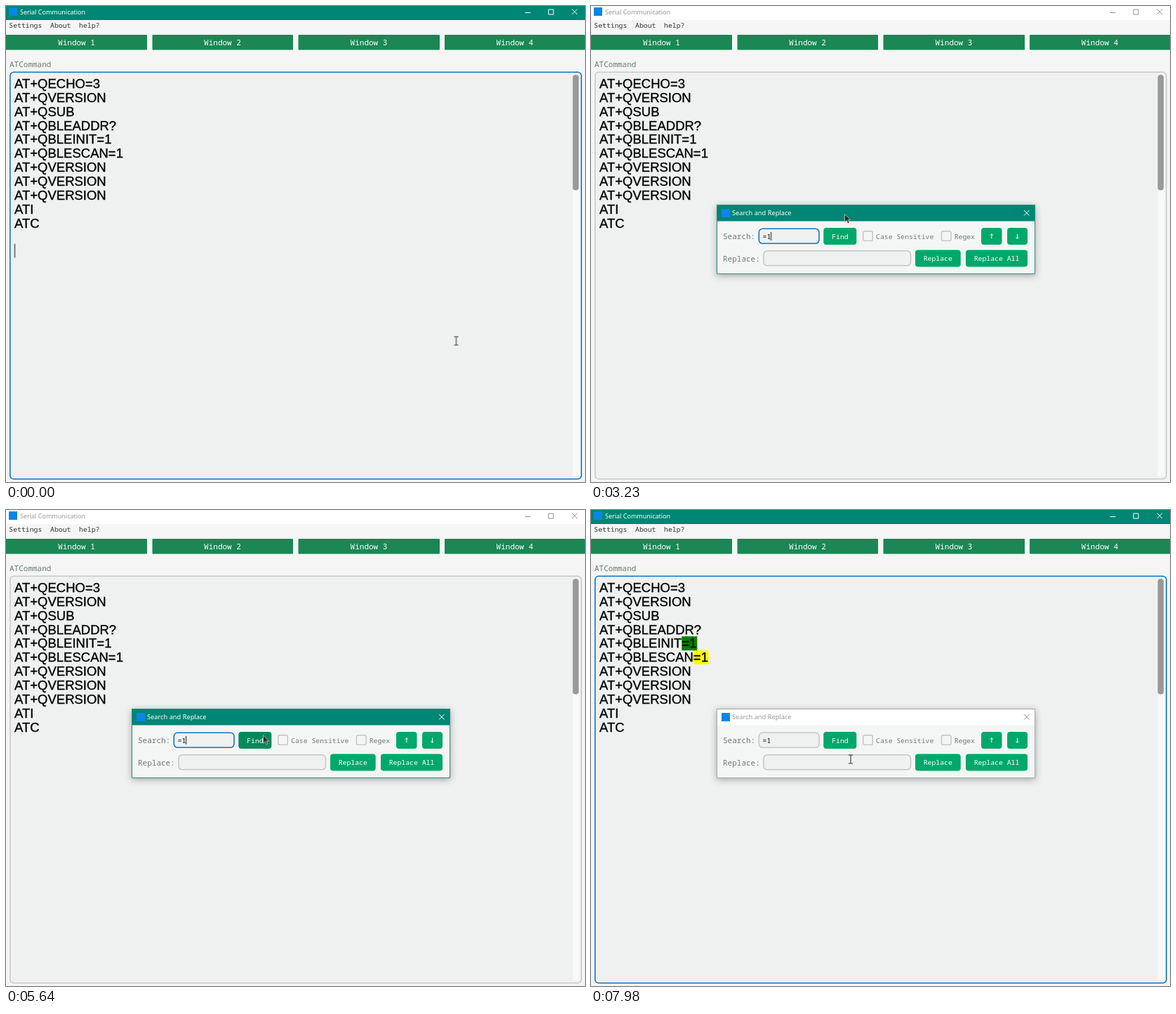
These frames come from a looping animation (825x678 px, 8 s). An HTML page:

```html
<!DOCTYPE html>
<html lang="en">
<head>
<meta charset="utf-8">
<title>Serial Communication</title>
<style>
  html, body { margin: 0; width: 100%; height: 100%; overflow: hidden; background: #f5f5f5; }
  svg { display: block; width: 100%; height: 100%; }

  .ui { font: 9px "Noto Sans", "Open Sans", sans-serif; }
  .mono { font: 9.8px "Noto Sans Mono", "DejaVu Sans Mono", monospace; }
  .big { font-size: 11px; }
  .mid { text-anchor: middle; }
  .code { font: 18.5px "Liberation Sans", Arial, sans-serif; stroke: #000; stroke-width: .35px; }
  .label { fill: #6b7d74; }
  .btn { fill: #00a86b; }
  .tab { fill: #1a8754; }
  .box { fill: #eff1f0; stroke: #c6c8c7; stroke-width: 1.6; }
  .check { fill: #f4f5f5; stroke: #c2c4c3; stroke-width: 1.4; }
  .logo { fill: #0a86e4; }
  .line { fill: none; stroke-width: 1; }

  /* Hard changes share one 8 s clock */
  .mainBar, .mainInk, .mainLine, .editor, .dlgBar, .dlgInk, .dlgLine, .dlgEdge, .search,
  .caret, .hits, .eq, .one, .fieldCaret, .find, .down, .beam, .arrow, .halo {
    animation: 8s step-end infinite;
  }
  .mainBar { animation-name: mainBar; }
  .mainInk { animation-name: mainInk; }
  .mainLine { animation-name: mainLine; }
  .editor { animation-name: editor; }
  .dlgBar { animation-name: dlgBar; }
  .dlgInk { animation-name: dlgInk; }
  .dlgLine { animation-name: dlgLine; }
  .dlgEdge { animation-name: dlgEdge; }
  .search { animation-name: search; }
  .caret { animation-name: caret; }
  .hits { animation-name: hits; }
  .eq { animation-name: eq; }
  .one { animation-name: one; }
  .fieldCaret { animation-name: fieldCaret; }
  .find { animation-name: find; }
  .down { animation-name: down; }
  .beam { animation-name: beam; }
  .arrow { animation-name: arrow; }
  .halo { animation-name: halo; }

  .dialog { animation: open 8s linear infinite; transform-origin: 406px 332.5px;
            filter: drop-shadow(0 2px 5px rgba(0,0,0,.32)); }
  .pointer { animation: move 8s linear infinite; }

  @keyframes mainBar { 0%, 78.37% { fill: #008675 } 25.12% { fill: #fff } }
  @keyframes mainInk { 0%, 78.37% { fill: #fff } 25.12% { fill: #999 } }
  @keyframes mainLine { 0%, 78.37% { stroke: #fff } 25.12% { stroke: #8c8c8c } }
  @keyframes editor { 0%, 77.49% { stroke: #0f75c4 } 25.12% { stroke: #c9cbca } }
  @keyframes dlgBar { 0% { fill: #008675 } 78.37% { fill: #fff } }
  @keyframes dlgInk { 0% { fill: #fff } 78.37% { fill: #999 } }
  @keyframes dlgLine { 0% { stroke: #fff } 78.37% { stroke: #8c8c8c } }
  @keyframes dlgEdge { 0% { stroke: #2b8d7f } 78.37% { stroke: #a9a9a9 } }
  @keyframes search { 0% { stroke: #0f75c4 } 77.49% { stroke: #c6c8c7 } }

  @keyframes caret {
    0% { opacity: 1; transform: translate(12.5px, 338.8px) }
    6.75% { opacity: 0; transform: translate(39.5px, 279.3px) }
    13.37% { opacity: 1; transform: translate(39.5px, 279.3px) }
    19.99% { opacity: 0; transform: translate(167.5px, 200px) }
    77.49%, 90.87% { opacity: 1; transform: translate(167.5px, 200px) }
    84.24%, 97.24% { opacity: 0; transform: translate(167.5px, 200px) }
  }
  @keyframes hits { 0% { opacity: 0 } 77.49% { opacity: 1 } }
  @keyframes eq { 0% { opacity: 0 } 36.62% { opacity: 1 } }
  @keyframes one { 0% { opacity: 0 } 40.37% { opacity: 1 } }
  @keyframes fieldCaret {
    0% { opacity: 1; transform: translateX(245.5px) }
    32.49% { opacity: 0; transform: translateX(245.5px) }
    36.62% { opacity: 1; transform: translateX(250.5px) }
    40.37%, 53.6%, 66.8% { opacity: 1; transform: translateX(256.5px) }
    47.87%, 60.2%, 72% { opacity: 0; transform: translateX(256.5px) }
  }
  @keyframes find { 0%, 72.95% { fill: #00a86b } 63% { fill: #048a5a } }
  @keyframes down { 0%, 61.9% { fill: #00a86b } 57.4% { fill: #048a5a } }
  @keyframes beam { 0%, 73.4%, 92.8% { opacity: 1 } 25.6%, 90.7% { opacity: 0 } }
  @keyframes arrow { 0%, 73.4%, 92.8% { opacity: 0 } 25.6%, 90.7% { opacity: 1 } }
  @keyframes halo { 0%, 78.37% { opacity: 0 } 77.49% { opacity: 1 } }

  @keyframes open {
    0%, 25.4% { opacity: 0; transform: scale(.92) }
    26.75% { opacity: .78; transform: scale(.989) }
    28.37%, 100% { opacity: 1; transform: none }
  }
  @keyframes move {
    0%, 1.4% { transform: translate(641.5px, 477px); animation-timing-function: ease-in-out }
    9.25%, 52% { transform: translate(361px, 296px) }
    54.5% { transform: translate(430px, 284px) }
    57% { transform: translate(582px, 316px) }
    59%, 61.4% { transform: translate(602px, 329px) }
    63.7%, 72.5% { transform: translate(366px, 320.5px) }
    74.75%, 87.4% { transform: translate(359px, 201.5px) }
    90% { transform: translate(390px, 262px) }
    92% { transform: translate(399px, 335px) }
    93.1%, 99.72% { transform: translate(372.5px, 352.5px) }
    99.73%, 100% { transform: translate(370px, 355px) }
  }
</style>
</head>
<body>
<svg viewBox="0 0 825 678" preserveAspectRatio="none">
  <rect width="825" height="678" fill="#f5f5f5"/>

  <!-- Title bar and menu -->
  <rect class="mainBar" width="825" height="20"/>
  <rect class="logo" x="4" y="2" width="12" height="12"/>
  <text class="ui mainInk" x="20" y="12">Serial Communication</text>
  <path class="line mainLine" d="M739.5 9.5h8M773 5h7v7h-7zM806.5 4.5l7.5 7.5M814 4.5l-7.5 7.5"/>
  <g class="mono" fill="#333">
    <text x="4.3" y="31">Settings</text>
    <text x="63" y="31">About</text>
    <text x="104" y="31">help?</text>
  </g>

  <!-- Window tabs -->
  <g class="tab">
    <rect y="41" width="201" height="21.5" rx="1"/>
    <rect x="208.5" y="41" width="200.5" height="21.5" rx="1"/>
    <rect x="416.5" y="41" width="201.5" height="21.5" rx="1"/>
    <rect x="625" y="41" width="200" height="21.5" rx="1"/>
  </g>
  <g class="mono big mid" fill="#fff">
    <text x="100.5" y="56">Window 1</text>
    <text x="308.5" y="56">Window 2</text>
    <text x="517" y="56">Window 3</text>
    <text x="725" y="56">Window 4</text>
  </g>

  <!-- Editor -->
  <text class="mono big label" x="5" y="86.5">ATCommand</text>
  <rect class="box editor" x="5.8" y="94.3" width="814" height="579.4" rx="5"/>
  <rect x="807.5" y="97" width="9.5" height="573" fill="#f9f9f9"/>
  <rect x="807.5" y="98" width="8.5" height="164.5" rx="4" fill="#999"/>
  <g class="hits">
    <rect x="129.3" y="180" width="22" height="20" fill="#008000"/>
    <rect x="145.6" y="200" width="22" height="19.8" fill="#ff0"/>
  </g>
  <text class="code" y="117">
    <tspan x="12">AT+QECHO=3</tspan>
    <tspan x="12" dy="19.85">AT+QVERSION</tspan>
    <tspan x="12" dy="19.85">AT+QSUB</tspan>
    <tspan x="12" dy="19.85">AT+QBLEADDR?</tspan>
    <tspan x="12" dy="19.85">AT+QBLEINIT=1</tspan>
    <tspan x="12" dy="19.85">AT+QBLESCAN=1</tspan>
    <tspan x="12" dy="19.85">AT+QVERSION</tspan>
    <tspan x="12" dy="19.85">AT+QVERSION</tspan>
    <tspan x="12" dy="19.85">AT+QVERSION</tspan>
    <tspan x="12" dy="19.85">ATI</tspan>
    <tspan x="12" dy="19.85">ATC</tspan>
  </text>
  <path class="line caret" d="M0 0v19.7" stroke="#000"/>

  <!-- Search dialog -->
  <g class="dialog">
    <rect x="179.5" y="283.5" width="453" height="98" fill="#f4f5f5"/>
    <rect class="dlgBar" x="180" y="284" width="452" height="22.5"/>
    <rect class="line dlgEdge" x="179.5" y="283.5" width="453" height="98"/>
    <rect class="logo" x="186" y="289" width="12" height="12"/>
    <text class="ui dlgInk" x="201" y="298.3" style="font-size:9.25px">Search and Replace</text>
    <path class="line dlgLine" d="M617 291l7.5 7.5M624.5 291l-7.5 7.5"/>

    <g class="mono big label">
      <text x="188" y="332">Search:</text>
      <text x="188" y="364">Replace:</text>
    </g>
    <rect class="box search" x="239.3" y="317.3" width="85.7" height="21" rx="5"/>
    <rect class="box" x="246" y="348.8" width="209.5" height="21" rx="5"/>
    <g class="mono" fill="#111">
      <text class="eq" x="244.5" y="331.5">=</text>
      <text class="one" x="250.5" y="331.5">1</text>
    </g>
    <path class="line fieldCaret" d="M0 322v12" stroke="#000"/>

    <rect class="check" x="387.7" y="320.8" width="13.6" height="13.6" rx="2.5"/>
    <rect class="check" x="499.5" y="320.8" width="13.6" height="13.6" rx="2.5"/>
    <g class="mono label">
      <text x="406" y="331.5">Case Sensitive</text>
      <text x="517.7" y="331.5">Regex</text>
    </g>

    <g class="btn">
      <rect class="find" x="331.3" y="316" width="47" height="24" rx="4"/>
      <rect x="556" y="316" width="29.5" height="24" rx="4"/>
      <rect class="down" x="593" y="316" width="29" height="24" rx="4"/>
      <rect x="462" y="347.5" width="64.7" height="24" rx="4"/>
      <rect x="534" y="347.5" width="88" height="24" rx="4"/>
    </g>
    <g class="mono mid" fill="#fff">
      <text x="355" y="331.5">Find</text>
      <text x="494.3" y="363">Replace</text>
      <text x="578" y="363">Replace All</text>
    </g>
    <path class="line" stroke="#fff" d="M570.8 331.5v-7M568.8 326.7l2-2.2 2 2.2M607.5 324.5v7M605.5 329.3l2 2.2 2-2.2"/>
  </g>

  <!-- Mouse pointer -->
  <g class="pointer">
    <circle class="halo" r="9" fill="#f5f26c"/>
    <path class="line beam" stroke="#222" d="M0-5.5v11M-3-6h2.2l.8.6.8-.6h2.2M-3 6h2.2l.8-.6.8.6h2.2"/>
    <path class="arrow" fill="#2b2b2b" stroke="#c4c8c8" stroke-width=".8" d="M.5.5v11.2l2.7-2.4 1.8 4.2 2-.9-1.8-4h3.6z"/>
  </g>
</svg>
</body>
</html>
```
